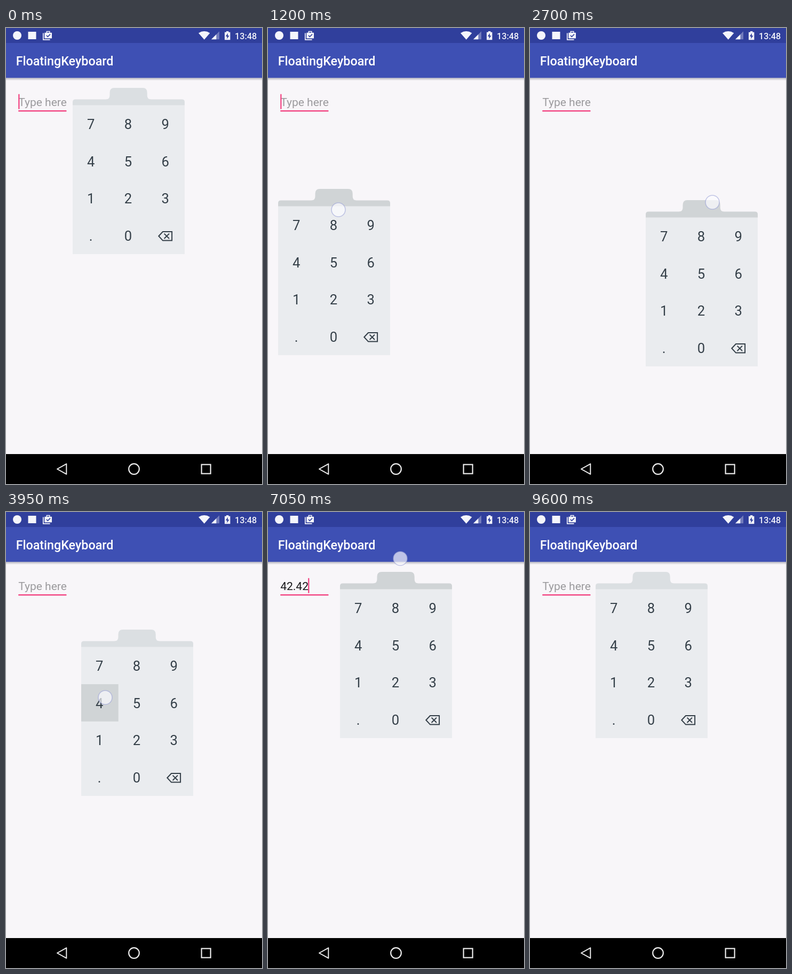
Recreate the animation shown at these times as an HTML page with a canvas. Size 480 by 853 pixels, loop 9650 ms.

```html
<!DOCTYPE html>
<html lang="en">
<head>
<meta charset="utf-8">
<title>FloatingKeyboard</title>
<style>
html, body { margin: 0; width: 100%; height: 100%; overflow: hidden; background: #f8f6f9; }
canvas { display: block; width: 100vw; height: 100vh; }
</style>
</head>
<body>
<canvas id="stage"></canvas>
<script>
const W = 480, H = 853, LOOP = 9650, STEP = 50;
const canvas = document.getElementById('stage');
const ctx = canvas.getContext('2d');
const ratio = window.devicePixelRatio || 1;
canvas.width = Math.round(W * ratio);
canvas.height = Math.round(H * ratio);

const PINK = '#f23f7f', INK = '#343f48', CELL = 69.7, HEAD = 32.4;
const GRIP = [113, 11];   // finger position on the handle
const LEAD = 60;          // the keyboard trails the finger by this many ms

// Keyboard drags: press, release, then [time, x, y] along the way.
const drags = [
  { down: 150, up: 1900, path: [[150, 125, 112], [300, 122, 114], [700, 66, 164], [1000, 23, 220],
    [1200, 19, 301], [1260, 19, 329], [1550, 19, 445], [1750, 19, 470]] },
  { down: 2300, up: 3450, path: [[2300, 19, 467], [2400, 34, 455], [2550, 150, 372], [2700, 217, 322],
    [2760, 229, 315], [2950, 240, 288], [3150, 225, 250], [3250, 205, 238], [3400, 148, 222], [3450, 141, 220]] },
  { down: 6300, up: 7500, path: [[6300, 141, 220], [6450, 141, 218], [6750, 137, 150], [7000, 135, 80],
    [7050, 135, 77], [7110, 135, 76], [7300, 127, 75], [7450, 123, 76]] }
];

// Key taps: press, release, column, row, finger position, resulting text.
const taps = [
  [3950, 4050, 0, 1, 186, 347, '4'],
  [4250, 4350, 1, 2, 256, 417, '42'],
  [4800, 4900, 0, 3, 186, 487, '42.'],
  [5250, 5350, 0, 1, 186, 347, '42.4'],
  [5500, 5600, 1, 2, 256, 417, '42.42']
];
for (let i = 0; i < 5; i++) {
  const down = 8250 + i * 200;
  taps.push([down, down + 50, 2, 3, 324, 370, '42.42'.slice(0, 4 - i)]);
}

const clamp = (v, lo, hi) => Math.min(hi, Math.max(lo, v));

// Smooth curve through timed points.
function along(path, t) {
  const last = path.length - 1;
  if (t <= path[0][0]) return path[0].slice(1);
  if (t >= path[last][0]) return path[last].slice(1);
  let i = 0;
  while (t >= path[i + 1][0]) i++;
  const a = path[i], b = path[i + 1], h = b[0] - a[0], u = (t - a[0]) / h;
  const slope = (k, axis) => {
    if (k === 0 || k === last) return 0;
    const p = path[k - 1], q = path[k], r = path[k + 1];
    const s = (q[axis] - p[axis]) / (q[0] - p[0]);
    const e = (r[axis] - q[axis]) / (r[0] - q[0]);
    return s * e <= 0 ? 0 : 2 * s * e / (s + e);
  };
  return [1, 2].map(axis => {
    const u2 = u * u, u3 = u2 * u;
    return (2 * u3 - 3 * u2 + 1) * a[axis] + (u3 - 2 * u2 + u) * h * slope(i, axis)
      + (3 * u2 - 2 * u3) * b[axis] + (u3 - u2) * h * slope(i + 1, axis);
  });
}

function keyboardAt(t) {
  let drag = drags[0];
  for (const d of drags) if (t >= d.down) drag = d;
  const [x, y] = along(drag.path, t);
  return [clamp(x, 19, 251), clamp(y, 112, 467)];
}

const fadeOut = (t, up, span) => t < up ? 1 : clamp(1 - (t - up) / span, 0, 1);

function text(str, x, y, size, color, weight = 400, align = 'left') {
  ctx.font = `${weight} ${size}px Roboto, sans-serif`;
  ctx.textAlign = align;
  ctx.fillStyle = color;
  ctx.fillText(str, x, y);
}

function rect(x, y, w, h, color) {
  ctx.fillStyle = color;
  ctx.fillRect(x, y, w, h);
}

function poly(points, closed = true) {
  ctx.beginPath();
  points.forEach(([x, y], i) => i ? ctx.lineTo(x, y) : ctx.moveTo(x, y));
  if (closed) ctx.closePath();
}

function fill(color) { ctx.fillStyle = color; ctx.fill(); }

function stroke(color, width) {
  ctx.strokeStyle = color;
  ctx.lineWidth = width;
  ctx.stroke();
}

function disc(x, y, r) {
  ctx.beginPath();
  ctx.arc(x, y, r, 0, Math.PI * 2);
}

function statusBar() {
  const white = '#f4f5fb', bar = '#303f9c';
  rect(0, 0, W, 28, bar);
  disc(21, 14, 8);
  fill(white);
  rect(41.5, 7, 15, 14, white);

  // bag with a tick
  poly([[69.8, 9.5], [69.8, 21.8], [82.5, 21.8]], false);
  stroke(white, 1.7);
  rect(72.3, 8.8, 13.7, 10.6, white);
  poly([[76.3, 9], [76.3, 6.6], [81.8, 6.6], [81.8, 9]], false);
  stroke(white, 1.5);
  poly([[75.8, 13.8], [78.3, 16.4], [83, 11.6]], false);
  stroke(bar, 1.6);

  // wifi
  ctx.beginPath();
  ctx.moveTo(371.7, 21.8);
  ctx.lineTo(361, 9.4);
  ctx.quadraticCurveTo(371.7, 2.6, 382.4, 9.4);
  ctx.closePath();
  fill(white);

  // signal
  poly([[385, 21.3], [400, 21.3], [400, 6.3]]);
  fill('rgba(255,255,255,.32)');
  poly([[385, 21.3], [394.3, 21.3], [394.3, 12]]);
  fill(white);

  // battery
  rect(410, 7.8, 10.4, 14.4, white);
  rect(413, 6, 4.4, 2, white);
  poly([[416, 9.5], [411.8, 15.8], [414.6, 15.8], [414.2, 20.6], [418.6, 14.2], [415.8, 14.2]]);
  fill(bar);
  text('13:48', 429, 20.5, 16.3, white, 500);
}

function toolbar() {
  rect(0, 28, W, 65.3, '#3e50b4');
  const shade = ctx.createLinearGradient(0, 93.3, 0, 98.5);
  shade.addColorStop(0, 'rgba(40,40,60,.3)');
  shade.addColorStop(1, 'rgba(40,40,60,0)');
  rect(0, 93.3, W, 5.2, shade);
  text('FloatingKeyboard', 18.7, 70, 23.3, '#fff', 500);
}

function navBar() {
  rect(0, 797, W, H - 797, '#000');
  ctx.lineJoin = 'round';
  poly([[96, 825], [113.3, 815.3], [113.3, 834.7]]);
  stroke('#ececec', 2);
  disc(240, 825, 9.8);
  stroke('#ececec', 2.2);
  ctx.lineJoin = 'miter';
  ctx.strokeRect(366.6, 816.6, 17, 17);
}

function field(t) {
  let value = '', since = 0;
  for (const tap of taps) if (t >= tap[1]) { value = tap[6]; since = tap[1]; }
  if (value) text(value, 23.2, 146, 21, '#151517');
  else text('Type here', 23.2, 146, 21, '#9b9a9d');
  rect(23.2, 154, 90.2, 2.3, PINK);
  if (Math.floor((t - since) / 500) % 2 === 0) {
    ctx.font = '400 21px Roboto, sans-serif';
    rect(23.2 + (value ? ctx.measureText(value).width - 0.8 : 0), 123.7, 2.2, 28, PINK);
  }
}

function header(color) {
  const top = 21.6;
  ctx.beginPath();
  ctx.moveTo(0, HEAD);
  ctx.lineTo(0, top + 5);
  ctx.quadraticCurveTo(0, top, 5, top);
  ctx.lineTo(62, top);
  ctx.quadraticCurveTo(69.5, top, 69.5, 14);
  ctx.lineTo(69.5, 9);
  ctx.quadraticCurveTo(69.5, 0, 78, 0);
  ctx.lineTo(131.5, 0);
  ctx.quadraticCurveTo(139.7, 0, 139.7, 9);
  ctx.lineTo(139.7, 14);
  ctx.quadraticCurveTo(139.7, top, 147, top);
  ctx.lineTo(205, top);
  ctx.quadraticCurveTo(210, top, 210, top + 5);
  ctx.lineTo(210, HEAD);
  ctx.closePath();
  fill(color);
}

function backspace(x, y) {
  poly([[x - 12.5, y], [x - 4.8, y - 8.3], [x + 12.3, y - 8.3], [x + 12.3, y + 8.3], [x - 4.8, y + 8.3]]);
  stroke(INK, 2);
  poly([[x - 2.2, y - 4.7], [x + 7.2, y + 4.7]], false);
  stroke(INK, 2);
  poly([[x - 2.2, y + 4.7], [x + 7.2, y - 4.7]], false);
  stroke(INK, 2);
}

function keyboard(t) {
  const [x, y] = keyboardAt(t);
  ctx.save();
  ctx.translate(x, y);
  rect(0, HEAD, 210, 278.6, '#eaecef');
  header(drags.some(d => t >= d.down && t < d.up) ? '#d0d4d6' : '#dbdfe2');
  for (const [down, up, col, row] of taps) {
    if (t < down || t >= up + 100) continue;
    ctx.globalAlpha = fadeOut(t, up, 100);
    rect(col * CELL, HEAD + row * CELL, CELL, CELL, '#d0d4d6');
  }
  ctx.globalAlpha = 1;
  [...'789456123.0'].forEach((key, i) => {
    text(key, 34.2 + (i % 3) * CELL, 77 + Math.floor(i / 3) * CELL, 25.6, INK, 400, 'center');
  });
  backspace(173.8, 277.3);
  ctx.restore();
}

function pointer(t) {
  let spot = null;
  for (const d of drags) {
    if (t < d.down || t >= d.up + 150) continue;
    const [x, y] = along(d.path, t + LEAD);
    spot = [x + GRIP[0], y + GRIP[1], fadeOut(t, d.up, 150)];
  }
  for (const [down, up, , , x, y] of taps) {
    if (t >= down && t < up + 200) spot = [x, y, fadeOut(t, up, 200)];
  }
  if (!spot) return;
  ctx.globalAlpha = spot[2];
  disc(spot[0], spot[1], 13);
  fill('rgba(252,252,255,.68)');
  stroke('rgba(150,156,214,.55)', 1.6);
  ctx.globalAlpha = 1;
}

function draw(t) {
  ctx.setTransform(canvas.width / W, 0, 0, canvas.height / H, 0, 0);
  rect(0, 0, W, H, '#f8f6f9');
  toolbar();
  statusBar();
  field(t);
  keyboard(t);
  navBar();
  pointer(t);
}

const start = performance.now();
function tick() {
  const t = (performance.now() - start) % LOOP;
  draw(Math.floor(t / STEP) * STEP);
  requestAnimationFrame(tick);
}
tick();
</script>
</body>
</html>
```
